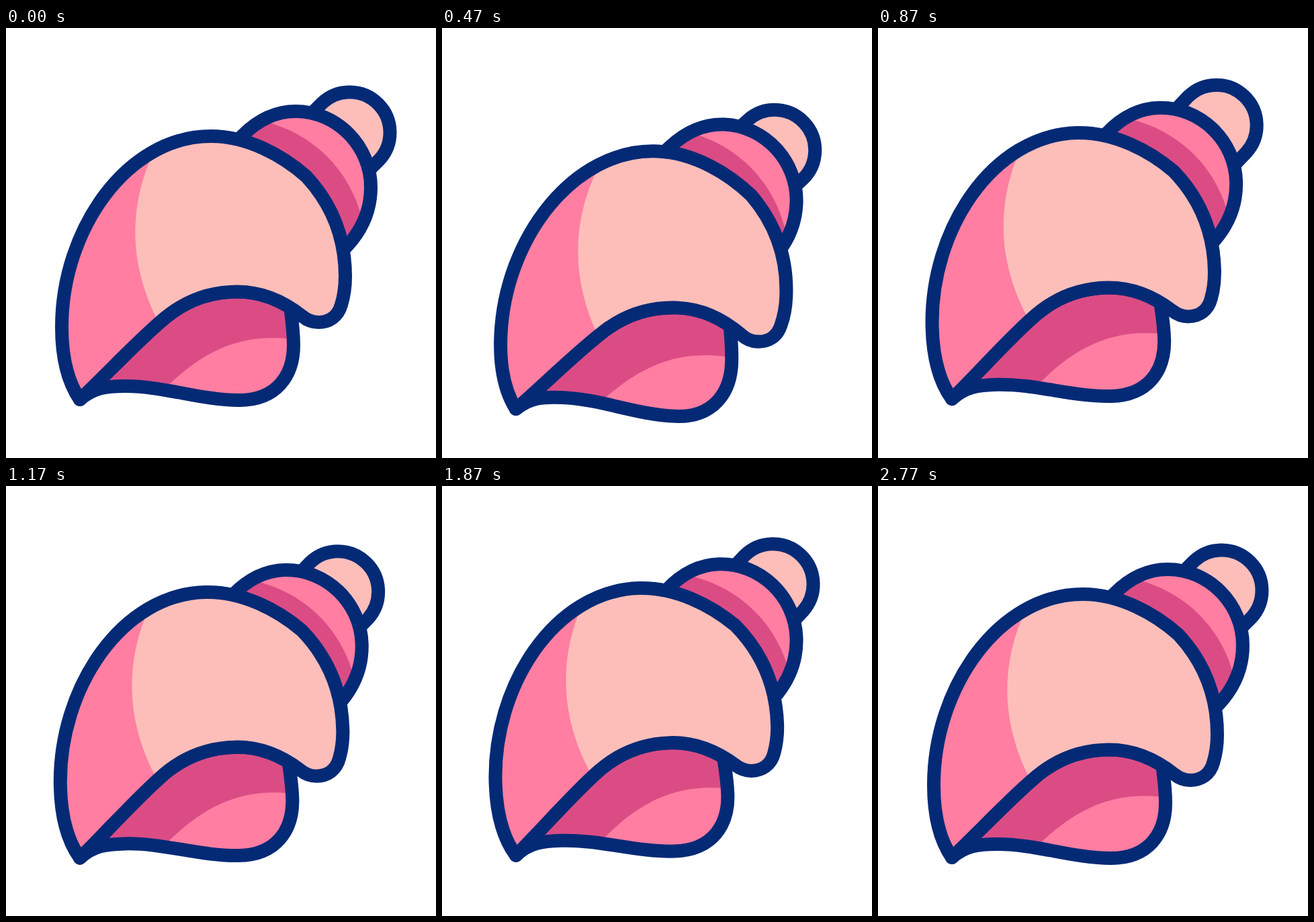
An HTML page for the animation above (3000 ms loop, 640 px wide and 640 px high).

```html
<!DOCTYPE html>
<html lang="en">
<head>
<meta charset="utf-8">
<title>Seashell</title>
<style>
  html, body { margin: 0; width: 100%; height: 100%; overflow: hidden; background: #fff; }
  svg { display: block; width: 100vw; height: 100vh; }
  .line { fill: none; stroke: #042a76; stroke-width: 20; stroke-linejoin: round; stroke-linecap: round; }
  .light { fill: #fdbeb9; }
  .pink { fill: #ff7ea1; }
  .dark { fill: #db4c85; }
</style>
</head>
<body>
<svg viewBox="0 0 640 640">
  <defs>
    <path id="capShape" d="M430 152.2 L470.6 111.6 A60 60 0 0 1 555.4 196.4 L515 236.8 Z"/>
    <path id="whorlShape" d="M330 182 L352 160 C375 137 400 124 431 124 C492 124 543 175 543 237 C543 270 530 300 508 324 L486 346 Z"/>
    <path id="mouthShape" d="M110 553 C130 535 150 533 178 533 C235 533 290 554 347 554 C402 554 428 518 428 472 C428 450 425 430 423 414 C400 402 380 392.5 344 392.5 C300 392.5 262 408 229 438 C190 472 150 515 110 553 Z"/>
    <path id="bodyShape" d="M110 553 C92 527 83 490 83 445 C83 300 180 161 305 161 C360 161 412 190 447 221 C485 262 505 310 505 370 C505 385 503 399 499 412 C494 430 480 438 465 438 C455 438 447 434 441 429 C412 406 380 392.5 344 392.5 C300 392.5 262 408 229 438 C190 472 150 515 110 553 Z"/>
    <clipPath id="mouthClip"><use href="#mouthShape"/></clipPath>
    <clipPath id="bodyClip"><use href="#bodyShape"/></clipPath>
  </defs>
  <g id="shell">
    <g id="cap">
      <use href="#capShape" class="light"/>
      <use href="#capShape" class="line"/>
    </g>
    <g id="whorl">
      <use href="#whorlShape" class="pink"/>
      <path class="dark" d="M380 138 C455 155 512 210 530 285 L508 324 L486 346 L330 182 Z"/>
      <use href="#whorlShape" class="line"/>
    </g>
    <use href="#mouthShape" class="dark"/>
    <path class="pink" clip-path="url(#mouthClip)" d="M232 541 L240 533 C290 485 345 453 425 463 L450 580 L232 580 Z"/>
    <use href="#mouthShape" class="line"/>
    <use href="#bodyShape" class="pink"/>
    <path class="light" clip-path="url(#bodyClip)" d="M215 195 C183 270 183 355 228 440 L520 460 L520 140 L240 140 Z"/>
    <use href="#bodyShape" class="line"/>
  </g>
</svg>
<script>
  const LOOP = 3000;
  const FRAME = 100 / 3;
  const SETTLED = 2770;    // everything is at rest from here on
  const DIP = 360;         // lowest point of the first dip
  const HALF_SWING = 330;  // time from one extreme to the next
  const SQUEEZE = 840;     // length of the first contraction
  const PIVOT = "110 553";

  const [shell, whorl, cap] = ["shell", "whorl", "cap"].map(id => document.getElementById(id));

  // Slides a part into the body along the shell's axis, plus the first contraction
  function retract(part, depth, squeeze) {
    const x = -depth - 24 * squeeze;
    const y = .9 * depth - 12 * squeeze;
    part.setAttribute("transform", `translate(${x} ${y})`);
  }

  function render(time) {
    const frame = Math.floor((time % LOOP + 3.4) / FRAME);
    const t = Math.min(frame * FRAME, SETTLED);

    // Ease into the first dip, then bounce with a fading swing
    const attack = Math.sin(Math.PI / 2 * Math.min(t / DIP, 1)) ** 2;
    const swingTime = Math.max(t, DIP);
    const phase = Math.PI * (swingTime - DIP) / HALF_SWING;
    const fade = (1 - swingTime / SETTLED) ** 1.5;
    const bounce = attack * fade * (Math.cos(phase) - .14);
    const drag = fade * Math.sin(phase);

    const lean = Math.sin(Math.PI * t / SETTLED);
    const squeeze = Math.sin(Math.PI * Math.min(t / SQUEEZE, 1)) ** 2;
    const degrees = (.18 * bounce - .023 * lean) * 180 / Math.PI;

    shell.setAttribute("transform", `translate(0 ${48 * bounce}) rotate(${degrees} ${PIVOT})`);
    retract(whorl, 3.5 * drag + 5.8 * lean, squeeze);
    retract(cap, 10 * drag + 5.5 * lean, squeeze);
  }

  const start = performance.now();
  function tick() {
    render(performance.now() - start);
    requestAnimationFrame(tick);
  }
  tick();
</script>
</body>
</html>
```
